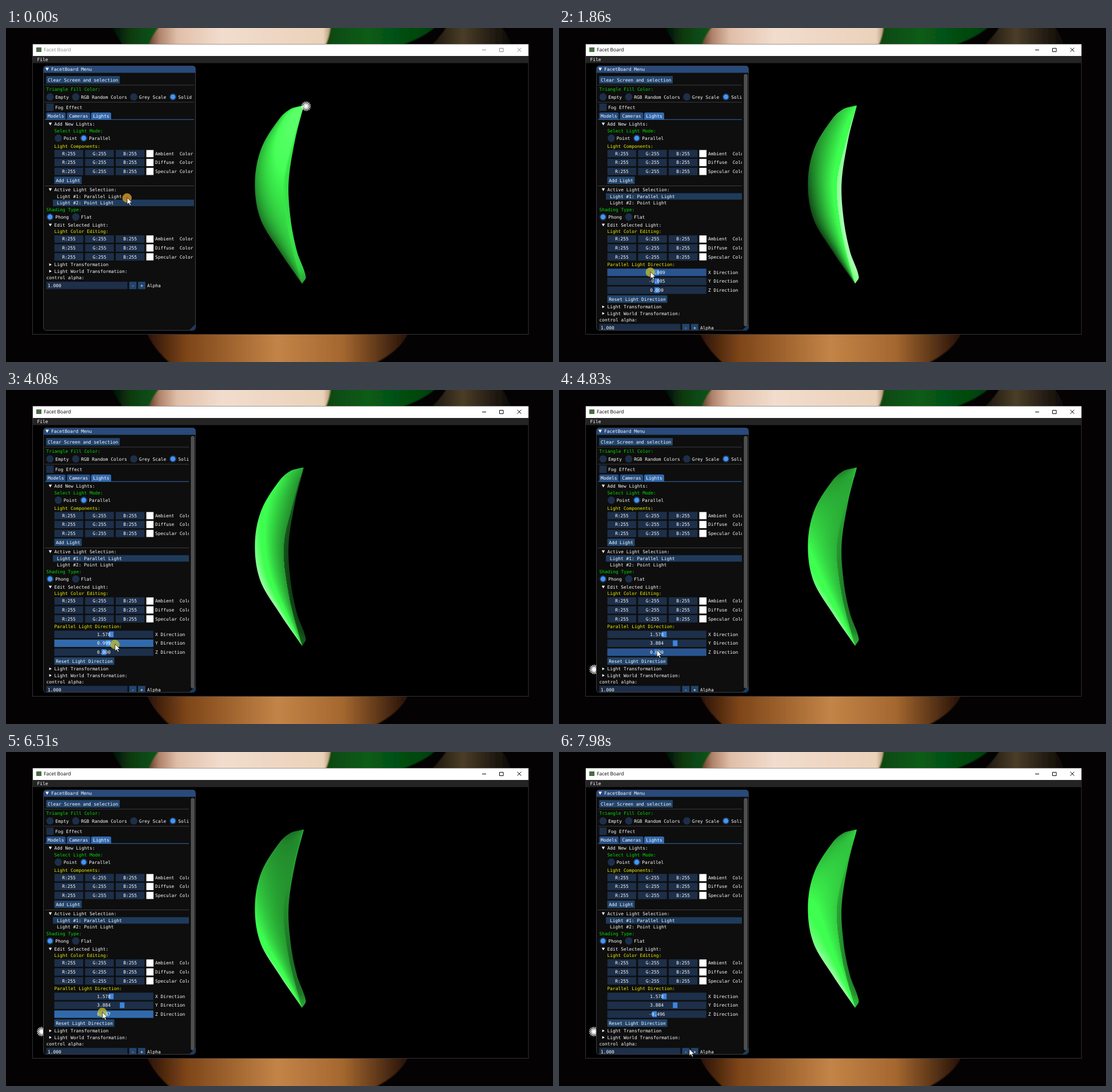
Write an HTML page with a canvas that moves like this. It is 957 px wide and 585 px high and loops after 8 s.

```html
<!DOCTYPE html>
<html lang="en">
<head>
<meta charset="utf-8">
<title>Facet Board</title>
<style>
html, body { margin: 0; width: 100%; height: 100%; overflow: hidden; background: #040202; }
svg, canvas { position: absolute; left: 0; top: 0; display: block; }
canvas { left: 430px; top: 130px; }
.m { font: 7.88px "DejaVu Sans Mono", monospace; white-space: pre; text-rendering: geometricPrecision; }
.s { font: 8.6px "Open Sans", sans-serif; text-rendering: geometricPrecision; }
</style>
</head>
<body>
<svg id="back" width="957" height="585" viewBox="0 0 957 585">
  <defs>
    <linearGradient id="peach"><stop offset="0" stop-color="#5f3d2c"/><stop offset=".06" stop-color="#b0836b"/><stop offset=".16" stop-color="#e0bfa9"/><stop offset=".4" stop-color="#f2dccd"/><stop offset=".96" stop-color="#ead2ba"/><stop offset="1" stop-color="#b39675"/></linearGradient>
    <linearGradient id="leafL"><stop offset="0" stop-color="#020a03"/><stop offset=".4" stop-color="#0b3c10"/><stop offset="1" stop-color="#0d5a18"/></linearGradient>
    <linearGradient id="leafR"><stop offset="0" stop-color="#0a4410"/><stop offset=".4" stop-color="#075c16"/><stop offset="1" stop-color="#063f0d"/></linearGradient>
    <linearGradient id="bark"><stop offset="0" stop-color="#19140c"/><stop offset=".4" stop-color="#4b3d28"/><stop offset="1" stop-color="#0b0805"/></linearGradient>
    <linearGradient id="glow"><stop offset="0" stop-color="#2a1206"/><stop offset=".15" stop-color="#7d4518"/><stop offset=".5" stop-color="#c38447"/><stop offset=".75" stop-color="#a4672f"/><stop offset="1" stop-color="#241006"/></linearGradient>
    <filter id="soft"><feGaussianBlur stdDeviation="1.2"/></filter>
  </defs>
  <rect width="957" height="585" fill="#040202"/>
  <g filter="url(#soft)">
    <path d="M183 -4L273 -4L250 32L205 32Z" fill="url(#leafL)"/>
    <path d="M560 -4H754Q730 18 686 32H550Z" fill="url(#leafR)"/>
    <path d="M772 -4H866Q880 14 884 32H742Q760 16 772 -4Z" fill="url(#bark)"/>
    <path d="M270 -4H568Q566 16 558 32H249Q256 12 270 -4Z" fill="url(#peach)"/>
    <path d="M246 534H704Q690 566 640 590H290Q258 562 246 534Z" fill="url(#glow)"/>
  </g>
  <rect x="46.5" y="28.5" width="867.5" height="508" fill="#000" stroke="#343434"/>
  <rect x="47" y="28.5" width="867" height="20.5" fill="#fff"/>
  <rect x="47" y="49" width="867" height="12.5" fill="#242424"/>
  <rect x="53" y="34" width="9" height="8" fill="#4a6b45"/>
  <text class="m" x="54.5" y="58.4" fill="#fff">File</text>
  <g id="chrome">
    <text class="s" x="66" y="41.3" fill="currentColor">Facet Board</text>
    <path d="M833 38.5H840M863.5 35.5H870V41.5H863.5ZM894.5 34.8L901.5 41.6M901.5 34.8L894.5 41.6" fill="none" stroke="currentColor"/>
  </g>
</svg>
<canvas id="fruit" width="100" height="324"></canvas>
<svg id="front" width="957" height="585" viewBox="0 0 957 585"></svg>

<script>
const $ = id => document.getElementById(id);
const FRAME = '#1d2f49', BUTTON = '#23456d', HOVER = '#29558f', ACTIVE = '#316aac', MARK = '#4296fa', GRAB = '#3d85e0';
const GREEN = '#00e000', YELLOW = '#f2f200', LINE = '#3d3d47';

// ---- markup helpers (y is the vertical centre of a row) ----
const rect = (x, y, w, h, fill, extra = '') => `<rect x="${x}" y="${y}" width="${w}" height="${h}" fill="${fill}" ${extra}/>`;
const text = (x, y, s, fill = '#fff', extra = '') => `<text class="m" x="${x}" y="${y + 2.8}" fill="${fill}" ${extra}>${s}</text>`;
const mid = (x, y, s, extra = '') => text(x, y, s, '#fff', `text-anchor="middle" ${extra}`);
const box = (x, y, w, fill = FRAME) => rect(x, y - 6.5, w, 13, fill);
const button = (x, y, w, s) => box(x, y, w, BUTTON) + mid(x + w / 2, y, s);
const rule = y => rect(68, y, 262, 1, LINE);
const radio = (x, y, s, on) => `<circle cx="${x}" cy="${y}" r="6.4" fill="${FRAME}"/>` +
  (on ? `<circle cx="${x}" cy="${y}" r="4.4" fill="${MARK}"/>` : '') + text(x + 9.2, y, s);
const open = (x, y, r = 2.7) => `<path d="M${x - r} ${y - r * .8}H${x + r}L${x} ${y + r}Z" fill="#fff"/>`;
const shut = (x, y) => `<path d="M${x - 1.8} ${y - 2.4}V${y + 2.4}L${x + 2.3} ${y}Z" fill="#fff"/>`;
const section = (y, s) => open(77.5, y) + text(84.5, y, s);
const folded = (y, s) => shut(77.5, y) + text(84.5, y, s);
const tab = (x, w, s, fill) => `<path d="M${x} 160.5V150.5Q${x} 148 ${x + 2.5} 148H${x + w - 2.5}Q${x + w} 148 ${x + w} 150.5V160.5Z" fill="${fill}"/>` + mid(x + w / 2, 154.5, s);
const colours = y => ['Ambient  Color', 'Diffuse  Color', 'Specular Color'].map((name, i) => {
  const cy = y + i * 15.6;
  return ['R', 'G', 'B'].map((c, k) => box(84.7 + k * 53.6, cy, 50.4) + mid(110 + k * 53.6, cy, c + ':255')).join('') +
    rect(245.5, cy - 6.3, 12.6, 12.6, '#fff') + text(261, cy, name);
}).join('');
const tail = y => folded(y, 'Light Transformation') + folded(y + 11.6, 'Light World Transformation:') +
  text(70.5, y + 23.2, 'control alpha:') + box(70.5, y + 36.5, 142) + text(73, y + 36.5, '1.000') +
  button(215.5, y + 36.5, 12.8, '-') + button(231, y + 36.5, 12.8, '+') + text(247, y + 36.5, 'Alpha');
const sliders = y => ['X', 'Y', 'Z'].map((name, i) => {
  const cy = y + i * 15.6;
  return `<rect id="bar${i}" x="84.5" y="${cy - 6.5}" width="173.3" height="13"/>` +
    `<rect id="grab${i}" y="${cy - 5}" width="8" height="10"/>` +
    mid(171.2, cy, '', `id="val${i}"`) + text(261, cy, name + ' Direction');
}).join('');
const spokes = Array.from({ length: 16 }, (_, i) => `<path d="M0 0V-8.4" transform="rotate(${i * 22.5})"/>`).join('');

$('front').innerHTML = `
<defs>
  <clipPath id="view"><rect x="47" y="62" width="867" height="474"/></clipPath>
  <clipPath id="inner"><rect id="innerBox" x="67" y="78" width="262" height="451"/></clipPath>
</defs>
<g clip-path="url(#view)"><g id="star" stroke="#fff" stroke-width="1.3">${spokes}</g></g>
${rect(65.5, 66.5, 266, 463, '#0e0e0e', `rx="4.7" stroke="${LINE}"`)}
<path d="M66 78.5V71Q66 66.5 70.5 66.5H327Q331.3 66.5 331.3 71V78.5Z" fill="#294a7a"/>
${open(72, 72, 3)}${text(79, 72.3, 'FacetBoard Menu')}
<g clip-path="url(#inner)">
  ${button(70.3, 90.7, 128.7, 'Clear Screen and selection')}${rule(99.5)}
  ${text(70.5, 107, 'Triangle Fill Color:', GREEN)}
  ${radio(77, 120.7, 'Empty')}${radio(122, 120.7, 'RGB Random Colors')}${radio(223.6, 120.7, 'Grey Scale')}${radio(292, 120.7, 'Solid', 1)}
  ${rule(129.5)}${box(70.5, 138.8, 12.8)}${text(86, 139, 'Fog Effect')}
  ${tab(70.3, 34, 'Models', '#284e81')}${tab(106.5, 41, 'Cameras', '#284e81')}${tab(149, 35, 'Lights', '#3369ad')}
  ${rect(68, 159.8, 262, 1, '#3369ad')}
  ${section(168, 'Add New Lights:')}${text(84.5, 179.7, 'Select Light Mode:', GREEN)}
  ${radio(91.5, 193, 'Point')}${radio(136, 193, 'Parallel', 1)}
  ${text(84.5, 206.8, 'Light Components:', YELLOW)}${colours(220)}
  ${button(84.5, 266.8, 48, 'Add Light')}${rule(276)}
  ${section(283, 'Active Light Selection:')}
  <rect id="pick" x="82" width="248" height="11.3"/>
  ${text(89, 295, 'Light #1: Parallel Light')}${text(89, 306.5, 'Light #2: Point Light')}
  ${text(70.5, 317.8, 'Shading Type:', GREEN)}${radio(77, 331, 'Phong', 1)}${radio(122, 331, 'Flat')}
  ${section(344.8, 'Edit Selected Light:')}
  ${text(84.5, 356.2, 'Light Color Editing:', YELLOW)}${colours(369.6)}
  <g id="pointUi">${tail(414.4)}</g>
  <g id="parallelUi">
    ${text(84.5, 414.3, 'Parallel Light Direction:', YELLOW)}${sliders(428)}
    ${button(84.5, 474.8, 105, 'Reset Light Direction')}${tail(488.3)}
  </g>
</g>
<g id="scroll">${rect(322, 79, 9, 450, '#090909')}${rect(323.3, 80.5, 6.6, 442, '#4f4f4f', 'rx="3.3"')}</g>
<path d="M331 519V526Q331 529.3 327.5 529.3H320.5Z" fill="#1b3a60"/>
<circle id="press" r="8.2"/>
<path id="arrow" d="M0 0V12.2L2.8 9.6L4.9 14L6.8 13.1L4.8 8.9H8.6Z" fill="#fff" stroke="#000" stroke-width=".7"/>`;

// ---- motion ----
const clamp = (v, a, b) => Math.min(b, Math.max(a, v));
const mix = (a, b, f) => a + (b - a) * f;
const ease = f => f * f * (3 - 2 * f);
const unit = v => { const l = Math.hypot(...v) || 1; return v.map(c => c / l); };

// linear track through [time, value] keys
function track(keys, t) {
  const i = keys.findIndex(k => k[0] > t);
  if (i === 0) return keys[0][1];
  if (i < 0) return keys[keys.length - 1][1];
  const [a, b] = [keys[i - 1], keys[i]];
  return mix(a[1], b[1], (t - a[0]) / (b[0] - a[0]));
}
const drags = [
  [[1890, -.009], [1910, -1.35], [2100, -1.35], [2350, 1.653], [3150, 1.653], [3200, 1.578]],
  [[3900, -.005], [4080, .992], [4500, 3.884]],
  [[5050, 0], [5400, -1.5], [5490, -.744], [5650, 2.3], [6240, 1.5], [6510, .496], [6600, -.3], [7080, -.3], [7300, -.496]]
];
const LAG = 200; // the sliders trail the pointer
const knob = v => 171.2 + 8.25 * v;
const stops = [
  { from: 0, to: 840, x: 212, y: 297 },
  { from: 1620, to: 3250, drag: 0, y: 427 },
  { from: 3620, to: 4560, drag: 1, y: 445 },
  { from: 4800, to: 7560, drag: 2, y: 455.5 },
  { from: 7980, to: 8000, x: 228, y: 520 }
];
const stopX = (s, t) => s.x ?? knob(track(drags[s.drag], t + LAG));

function pointer(t) {
  const i = stops.findLastIndex(s => s.from <= t), s = stops[i], next = stops[i + 1];
  if (t <= s.to) return { x: stopX(s, t), y: s.y, stop: s };
  const f = ease((t - s.to) / (next.from - s.to));
  return { x: mix(stopX(s, s.to), stopX(next, next.from), f), y: mix(s.y, next.y, f), stop: {} };
}

// ---- shaded fruit ----
// smooth curve through a few [y, x] points
function curve(pts) {
  const slope = i => {
    const a = pts[Math.max(0, i - 1)], b = pts[Math.min(pts.length - 1, i + 1)];
    return (b[1] - a[1]) / (b[0] - a[0]);
  };
  return y => {
    const i = clamp(pts.findIndex(p => p[0] > y) - 1, 0, pts.length - 2) || (y >= pts[pts.length - 1][0] ? pts.length - 2 : 0);
    const [a, b] = [pts[i], pts[i + 1]], h = b[0] - a[0], f = (y - a[0]) / h;
    return mix(a[1], b[1], ease(f)) + h * f * (1 - f) * ((1 - f) * slope(i) - f * slope(i + 1));
  };
}
const TOP = 136, BOTTOM = 448, OX = 430, OY = 130, W = 100, H = 324;
const left = curve([[TOP, 518], [141, 499], [158, 479], [210, 447], [270, 435.5], [334, 445], [393, 480], [BOTTOM, 518]]);
const right = curve([[TOP, 521], [195, 506], [270, 494.5], [335, 498], [391, 509], [436, 524.5], [BOTTOM, 518]]);
const ridge = curve([[TOP, 520], [195, 503], [275, 486], [365, 496], [BOTTOM, 518]]);
const centre = y => (left(y) + right(y)) / 2;

const outline = new Path2D();
for (let y = TOP; y <= BOTTOM; y++) outline.lineTo(left(y) - OX, y - OY);
for (let y = BOTTOM; y >= TOP; y--) outline.lineTo(right(y) - OX, y - OY);
outline.closePath();

const fruit = $('fruit').getContext('2d');
const image = fruit.createImageData(W, H);
const normals = new Float32Array(W * H * 3);
for (let j = 0; j < H; j++) {
  const y = clamp(j + OY + .5, TOP, BOTTOM), y0 = Math.max(TOP + 2, y - 14), y1 = Math.min(BOTTOM - 2, y + 14);
  const l = left(y), r = right(y), m = ridge(y);
  const [across, along] = unit([y1 - y0, centre(y0) - centre(y1)]);
  const tilt = .37 * (y - 292) / 156;
  for (let i = 0; i < W; i++) {
    const x = i + OX + .5;
    const deg = x < m ? -60 + 85 * clamp((x - l) / Math.max(1, m - l), 0, 1) ** .75
      : 60 + 15 * clamp((x - m) / Math.max(1, r - m), 0, 1);
    const a = deg * Math.PI / 180, s = Math.sin(a);
    normals.set(unit([s * across, s * along + tilt, Math.cos(a)]), (j * W + i) * 3);
  }
}

let lastLight = '';
function paint(point, dir) {
  const key = point + dir.join();
  if (key === lastLight) return;
  lastLight = key;
  let [lx, ly, lz] = [-dir[0], dir[1], -dir[2] * 1.6];
  const base = point ? .68 : .82, gain = point ? .55 : .65, shine = point ? .3 : 1.25;
  for (let p = 0, n = 0; p < W * H; p++, n += 3) {
    if (point) [lx, ly, lz] = unit([525 - OX - p % W, 137 - OY - Math.floor(p / W), 60]);
    const c = lx * normals[n] + ly * normals[n + 1] + lz * normals[n + 2];
    const g = clamp(base + gain * c, .14, 1), pale = clamp((c - .42) * shine, 0, .65);
    image.data.set([mix(62 * g, 240, pale), 255 * g, mix(80 * g, 240, pale), 255], p * 4);
  }
  fruit.putImageData(image, 0, 0);
  fruit.globalCompositeOperation = 'destination-in';
  fruit.fill(outline);
  fruit.globalCompositeOperation = 'source-over';
}

// ---- frame ----
const set = (id, attrs) => Object.entries(attrs).forEach(([k, v]) => $(id).setAttribute(k, v));
const show = (id, on) => { $(id).style.display = on ? '' : 'none'; };
const move = (id, x, y) => set(id, { transform: `translate(${x} ${y})` });

function draw(t) {
  const picked = t >= 120;
  const vals = drags.map(keys => track(keys, t));
  const dir = unit(vals);
  const { x, y, stop } = pointer(t);
  $('chrome').style.color = t >= 60 ? '#000' : '#8c8c8c';

  show('pointUi', !picked);
  show('parallelUi', picked);
  show('scroll', picked);
  set('innerBox', { width: picked ? 253 : 262 });
  set('pick', { y: picked ? 289.3 : 300.7, fill: picked && y < 300 ? '#387bca' : '#1f3b5c' });

  vals.forEach((v, i) => {
    const over = stop.drag === i, on = over && t > stop.from + 260;
    set('bar' + i, { fill: on ? ACTIVE : over ? HOVER : FRAME });
    set('grab' + i, { fill: on ? MARK : GRAB, x: knob(v) - 4 });
    $('val' + i).textContent = v.toFixed(3);
  });

  paint(!picked, dir);
  show('star', !picked || dir[0] > 0);
  if (picked) move('star', 93 - 34 * dir[1] + 6 * dir[2], 533 - 47 * dir[1]);
  else move('star', 525, 137);

  const dragging = stop.drag >= 0 && t > stop.from + 160 && t < stop.to - 160;
  move('arrow', x, y);
  move('press', x - .3, y + .7);
  show('press', t < 150 || dragging);
  set('press', { fill: dragging ? 'rgba(196,190,48,.76)' : 'rgba(200,145,42,.86)' });
}

function tick() {
  draw(performance.now() % 8000);
  requestAnimationFrame(tick);
}
draw(0);
requestAnimationFrame(tick);
</script>
</body>
</html>
```
